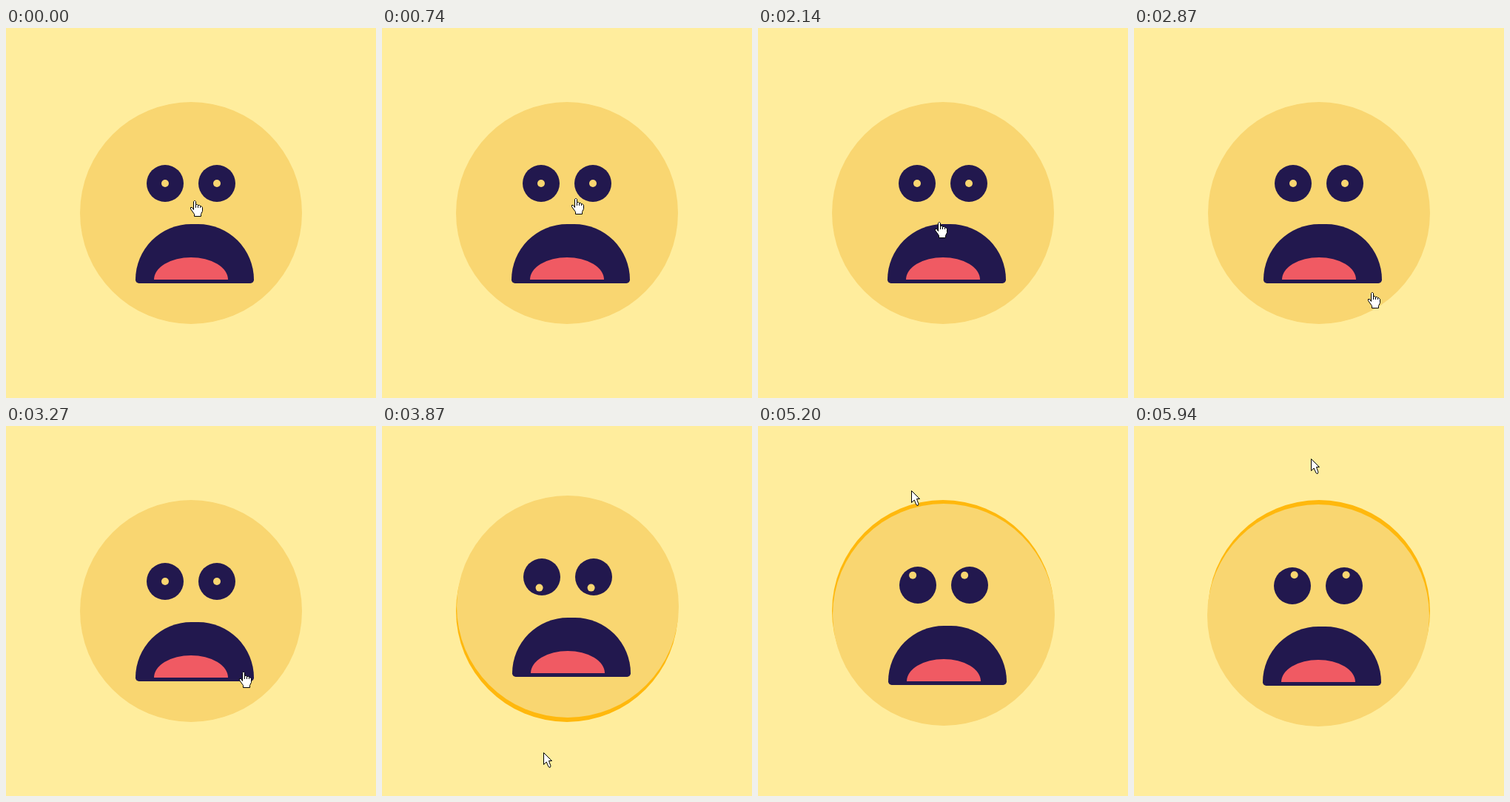
An HTML page with a canvas for the animation above (6 s loop, 500 by 500 pixels).

```html
<!DOCTYPE html>
<html lang="en">
<head>
<meta charset="utf-8">
<title>Watching face</title>
<style>
  html, body { margin: 0; width: 100%; height: 100%; overflow: hidden; background: #ffed9d; }
  canvas { display: block; }
</style>
</head>
<body>
<canvas id="stage" width="500" height="500"></canvas>
<script>
const ctx = document.getElementById('stage').getContext('2d');
const LOOP = 6000, FPS = 15, CENTER = 250, RADIUS = 150;
const LEAN = 6.05, GAZE = 15;
const BACKDROP = '#ffed9d', SKIN = '#f9d671', RIM = '#ffb80d', NAVY = '#22184e', TONGUE = '#f05a63';

// Each sweep of the pointer is one curve through a far point to a resting point
const home = [255, 233];
const sweeps = [
  { start: 2, end: 11, via: [394, 80], to: [262, 230] },
  { start: 13, end: 22, via: [46, 70], to: [271, 222] },
  { start: 23, end: 32, via: [40, 252], to: [245, 262] },
  { start: 33, end: 43, via: [212, 446], to: [322, 357] },
  { start: 43, end: 50, via: [394, 424], to: [262, 262] },
  { start: 52, end: 58, via: [205, 400], to: [218, 441] },
  { start: 61, end: 71, via: [115, 385], to: [71, 268] },
  { start: 71, end: 81, via: [141, 113], to: [345, 85] },
  { start: 82, end: 89, via: [354, 81], to: [239, 44] }
];
sweeps.forEach((sweep, i) => sweep.from = i ? sweeps[i - 1].to : home);

const arrow = new Path2D('M.5 .5 11.5 11.5H7.5L10 18.5 9 20.5 7 19.5 4.2 13 .5 16.5Z');
const hand = new Path2D('M4.5 12.5V1.5L5.5 .5H6.5L7.5 1.5V5.5H9.5L10.5 6.5H12.5L13.5 7.5H14.5' +
  'L16.5 9.5V14.5L14.5 18.5V21.5H5.5V18.5L.5 11.5V9.5H2.5Z');
const knuckles = new Path2D('M7.5 5.5V10M10.5 6.5V10M13.5 7.5V10');

// Pointer position at a tick, or where it was `lag` ticks before along the same sweep
function pointerAt(tick, lag = 0) {
  const { start, end, from, via, to } = sweeps.findLast(s => s.start <= tick) || sweeps[0];
  const p = Math.max(0, (Math.min(tick, end) - lag - start) / (end - start)), q = 1 - p;
  return from.map((a, i) => {
    const control = 2 * via[i] - (a + to[i]) / 2;
    return q * q * a + 2 * q * p * control + p * p * to[i];
  });
}

// Vector of the given length from the middle of the face towards a point
function towards([x, y], length) {
  const angle = Math.atan2(y - CENTER, x - CENTER);
  return [length * Math.cos(angle), length * Math.sin(angle)];
}

function disc(x, y, r, color) {
  ctx.fillStyle = color;
  ctx.beginPath();
  ctx.arc(x, y, r, 0, 2 * Math.PI);
  ctx.fill();
}

function drawFace([dx, dy], [gazeX, gazeY]) {
  if (dx || dy) disc(CENTER, CENTER, RADIUS, RIM);
  ctx.save();
  ctx.translate(dx, dy);
  disc(CENTER, CENTER, RADIUS, SKIN);
  for (const x of [215, 285]) {
    disc(x, 210, 25, NAVY);
    disc(x + gazeX, 210 + gazeY, 5, SKIN);
  }
  ctx.fillStyle = NAVY;
  ctx.beginPath();
  ctx.roundRect(175, 265, 160, 80, [80, 80, 5, 5]);
  ctx.fill();
  ctx.fillStyle = TONGUE;
  ctx.beginPath();
  ctx.ellipse(250, 340, 50, 30, 0, Math.PI, 2 * Math.PI);
  ctx.fill();
  ctx.restore();
}

function drawPointer([x, y], overFace) {
  const shape = overFace ? hand : arrow;
  ctx.save();
  ctx.translate(Math.round(x) - (overFace ? 6 : 0), Math.round(y));
  ctx.fillStyle = '#fff';
  ctx.strokeStyle = '#000';
  ctx.fill(shape);
  ctx.stroke(shape);
  if (overFace) ctx.stroke(knuckles);
  ctx.restore();
}

function draw() {
  const tick = Math.floor(performance.now() % LOOP * FPS / 1000);
  const pointer = pointerAt(tick);
  const overFace = Math.hypot(pointer[0] - CENTER, pointer[1] - CENTER) < RADIUS;
  ctx.fillStyle = BACKDROP;
  ctx.fillRect(0, 0, 500, 500);
  if (overFace) {
    drawFace([0, 0], [0, 0]);
  } else {
    // The face leans away from the pointer; the pupils follow it a little late
    const lean = towards(pointerAt(tick, 0.25), -LEAN).map(Math.floor);
    drawFace(lean, towards(pointerAt(tick, 1), GAZE));
  }
  drawPointer(pointer, overFace);
  requestAnimationFrame(draw);
}
draw();
</script>
</body>
</html>
```
